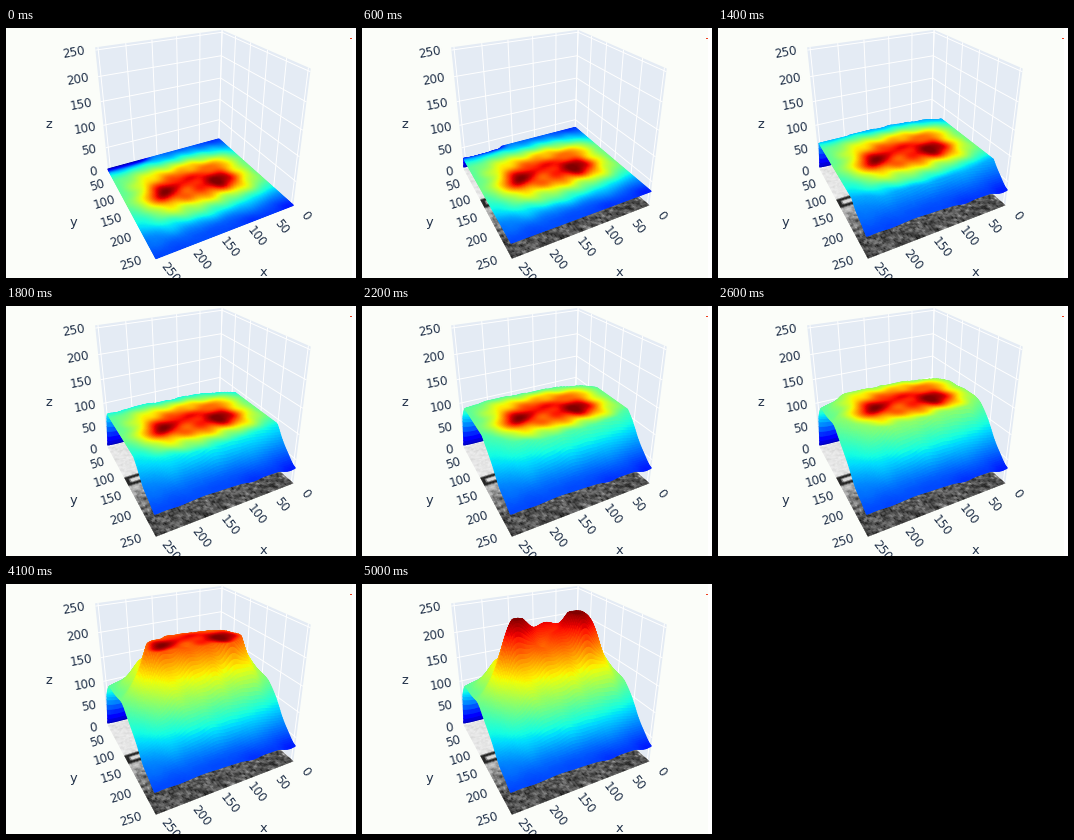
A matplotlib script for the animation above (5.1 s loop, 350 by 250 pixels).

```python
import numpy as np
import matplotlib.pyplot as plt
from matplotlib.animation import FuncAnimation
from matplotlib.collections import LineCollection, PolyCollection
from matplotlib.patches import Polygon, Rectangle

W, H, DPI = 350, 250, 100
FRAMES, INTERVAL, STEP = 51, 100, 5
SIZE = 255
INK, WALL, PAPER = "#22324a", "#e4ebf4", "#fbfdf9"

plt.rcParams["font.family"] = "DejaVu Sans"

# Visible corners of the axes box: x, y, z in units of SIZE, then the pixel.
CORNERS = [
    (1, 0, 0, 102, 143), (0, 0, 0, 213, 109), (0, 1, 0, 287, 179),
    (1, 1, 0, 150, 229), (1, 0, 1, 89, 18.5), (0, 0, 1, 216, 3),
    (0, 1, 1, 305, 40),
]


def fit_camera():
    """Least-squares 3x4 projection through the box corners."""
    rows, rhs = [], []
    for x, y, z, px, py in CORNERS:
        p = [x, y, z, 1]
        rows.append(p + [0] * 4 + [-px * x, -px * y, -px * z])
        rows.append([0] * 4 + p + [-py * x, -py * y, -py * z])
        rhs += [px, py]
    sol = np.linalg.lstsq(np.array(rows, float), np.array(rhs), rcond=None)[0]
    return np.append(sol, 1).reshape(3, 4)


CAMERA = fit_camera()


def project(x, y, z):
    x, y, z = np.broadcast_arrays(x, y, z)
    p = np.stack([x, y, z, np.ones(x.shape)], -1) @ CAMERA.T
    return p[..., :2] / p[..., 2:]


def smooth(t, start, end):
    t = np.clip((t - start) / (end - start), 0, 1)
    return t * t * (3 - 2 * t)


def peak(u, v, cu, cv, radius):
    return np.exp(-((u - cu) ** 2 + (v - cv) ** 2) / radius ** 2)


def ripples(u, v, count=14):
    """Seeded sum of plane waves."""
    rng = np.random.default_rng(11)
    total = np.zeros_like(u)
    for _ in range(count):
        angle, phase = rng.uniform(0, 2 * np.pi, 2)
        k = rng.uniform(16, 48)
        total += np.sin(k * (u * np.cos(angle) + v * np.sin(angle)) + phase)
    return total / np.sqrt(count / 2)


def terrain(u, v):
    # A shelf that drops to the front and back edges.
    base = 34 + 10 * u
    rise = smooth(v, -0.05, 0.42 - 0.22 * u)
    fall = 1 - smooth(v, 0.65 - 0.2 * u, 1)
    shelf = base + (110 - base) * rise * fall
    shelf -= 45 * smooth(u, 0.62, 0.75) * (1 - smooth(v, 0, 0.08))
    # A broad mound on the shelf, with two summits.
    mound = np.exp(-((u - 0.49) / 0.4) ** 4 - ((v - 0.47) / 0.28) ** 2)
    summits = (38 * peak(u, v, 0.745, 0.48, 0.09)
               + 46 * peak(u, v, 0.28, 0.545, 0.1))
    rough = (1.2 + 7 * mound) * ripples(u, v)
    return np.clip(shelf + 115 * mound + summits + rough, 2, SIZE)


def quads(grid):
    """Cell outlines in back-to-front order."""
    cells = [grid[:-1, :-1], grid[:-1, 1:], grid[1:, 1:], grid[1:, :-1]]
    return np.stack(cells, 2).reshape(-1, 4, 2)


def cell_mean(a):
    return (a[:-1, :-1] + a[:-1, 1:] + a[1:, 1:] + a[1:, :-1]).ravel() / 4


def mesh(n):
    t = np.linspace(0, 1, n + 1)
    return np.meshgrid(t, t)


def floor_shades(u, v):
    """Soft grey stand-in for the picture on the floor."""
    rng = np.random.default_rng(4)
    grain = rng.normal(0, 0.22, u.shape)
    streaks = 0.05 * np.sin(80 * v + 60 * u)
    shade = 0.9 - 0.62 * smooth(v, 0.35, 0.85)
    shade += (grain + streaks) * (0.2 + 0.8 * smooth(v, 0.4, 0.7))
    label = (u > 0.86) & (abs(v - 0.47) < 0.05)
    shade[label] = 0.1
    shade[label & (abs(v - 0.47) < 0.02) & (abs(u - 0.93) < 0.04)] = 0.85
    return np.clip(shade, 0.05, 0.95)


fig = plt.figure(figsize=(W / DPI, H / DPI), dpi=DPI, facecolor="white")
ax = fig.add_axes([0, 0, 1, 1])
ax.set(xlim=(0, W), ylim=(H, 0))
ax.axis("off")


def draw_walls():
    a, b = np.array([0, 1, 1, 0]), np.array([0, 0, 1, 1])
    ax.add_patch(Polygon(project(a, 0, b), fc=WALL, ec="none", zorder=0))
    ax.add_patch(Polygon(project(0, a, b), fc=WALL, ec="none", zorder=0))
    ends = np.array([0, 1])
    lines = []
    for t in np.arange(0, 251, 50) / SIZE:
        lines += [project(t, 0, ends), project(ends, 0, t),
                  project(0, t, ends), project(0, ends, t)]
    ax.add_collection(LineCollection(lines, colors="white", linewidths=0.7,
                                     zorder=1))


def label(x, y, text, angle=0, px=12):
    ax.text(x, y, text, color=INK, fontsize=px * 72 / DPI, rotation=angle,
            ha="center", va="center_baseline" if angle == 0 else "center",
            zorder=5)


def draw_ticks(edge, near, far, angle, first=0):
    """Numbers along a box edge; the gap to it goes from near to far."""
    near, far = np.array(near), np.array(far)
    for value in range(first, 251, 50):
        gap = near + (far - near) * (value - first) / (250 - first)
        label(*(project(*edge(value / SIZE)) + gap), str(value), angle)


def draw_labels():
    draw_ticks(lambda t: (1, 0, t), (-15, 3), (-22, 2.5), 10)
    draw_ticks(lambda t: (1, t, 0), (-17.5, 3), (-23.8, 7), 17, first=50)
    draw_ticks(lambda t: (t, 1, 0), (12, 11), (10.3, 15.6), -52)
    for x, y, name in ((43, 94.5, "z"), (67.5, 193, "y"), (258, 243.5, "x")):
        label(x, y, name, px=13)


ax.add_patch(Rectangle((0, 0), 346, H, fc=PAPER, ec="none", zorder=-1))
draw_walls()
draw_labels()
ax.add_patch(Rectangle((344, 10), 2, 1, fc="#f04020", ec="none", zorder=5))

fu, fv = mesh(100)
shades = cell_mean(floor_shades(fu, fv))
ax.add_collection(PolyCollection(
    quads(project(fu, fv, 0)), facecolors=plt.cm.gray(shades),
    edgecolors="face", linewidths=0.2, zorder=2))

U, V = mesh(96)
HEIGHT = terrain(U, V)
surface = PolyCollection(
    quads(project(U, V, 0)),
    facecolors=plt.cm.jet(0.03 + 0.97 * cell_mean(HEIGHT) / SIZE),
    edgecolors="face", linewidths=0.9, joinstyle="round", zorder=3)
ax.add_collection(surface)


def update(i):
    level = i * STEP
    surface.set_verts(quads(project(U, V, np.minimum(HEIGHT, level) / SIZE)))
    return [surface]


anim = FuncAnimation(fig, update, frames=FRAMES, interval=INTERVAL,
                     repeat=True, blit=False)
plt.show()
```
